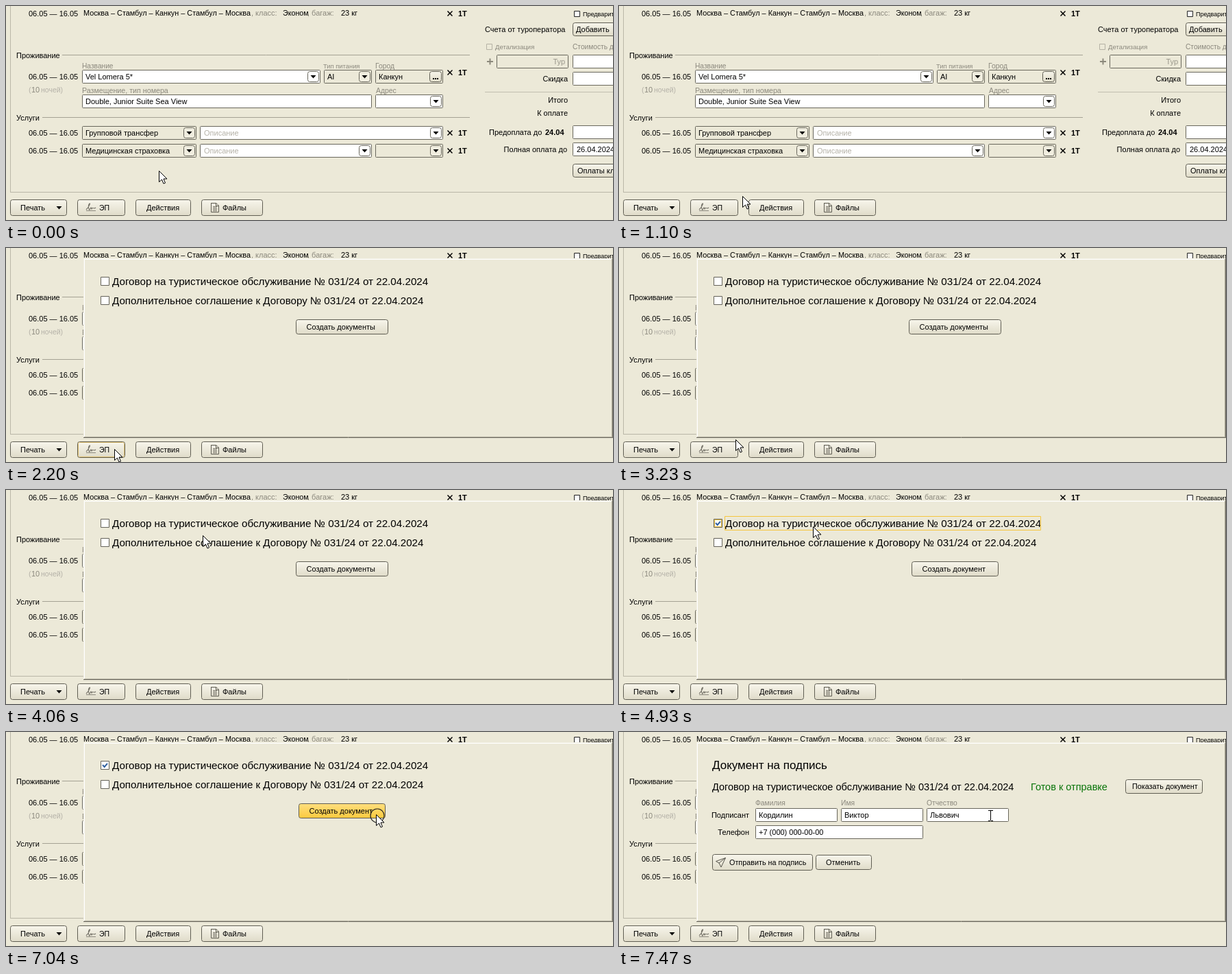
These frames come from a looping animation (886 by 312 pixels, 8000 ms). An HTML page with a canvas:

```html
<!DOCTYPE html>
<html lang="ru">
<head>
<meta charset="utf-8">
<title>Заявка</title>
<style>
html, body { margin: 0; width: 100%; height: 100%; overflow: hidden; background: #ece9d8; }
canvas { display: block; width: 886px; height: 312px; }
</style>
</head>
<body>
<canvas id="stage" width="886" height="312"></canvas>
<script>
const ctx = document.getElementById('stage').getContext('2d');
const LOOP = 8000;
const BG = '#ece9d8', EDGE = '#69675c', RULE = '#a5a294', LABEL = '#8b887d', HINT = '#b5b2a8', AMBER = '#f5c53d';

function text(s, x, y, { size = 11, color = '#000', bold = false, align = 'left' } = {}) {
  ctx.font = `${bold ? 'bold ' : ''}${size}px "Liberation Sans", Arial, sans-serif`;
  ctx.fillStyle = color;
  ctx.textAlign = align;
  ctx.fillText(s, x, y);
}
const label = (s, x, y, size = 10.4) => text(s, x, y, { size, color: LABEL });
const right = (s, x, y, color) => text(s, x, y, { align: 'right', color });

function line(points, color = EDGE, width = 1) {
  ctx.beginPath();
  points.forEach(([x, y]) => ctx.lineTo(x, y));
  ctx.strokeStyle = color;
  ctx.lineWidth = width;
  ctx.stroke();
}
const hline = (x1, x2, y, color = RULE) => line([[x1, y + .5], [x2, y + .5]], color);
const vline = (x, y1, y2, color = RULE) => line([[x + .5, y1], [x + .5, y2]], color);

function box(x, y, w, h, fill, edge = EDGE, radius = 1) {
  ctx.beginPath();
  ctx.roundRect(x + .5, y + .5, w - 1, h - 1, radius);
  if (fill) { ctx.fillStyle = fill; ctx.fill(); }
  ctx.strokeStyle = edge;
  ctx.lineWidth = 1;
  ctx.stroke();
}

function button(x, y, w, h, state = '') {
  const fill = ctx.createLinearGradient(0, y, 0, y + h);
  const [top, bottom] = state === 'pressed' ? ['#ffdf80', '#fbc93c'] : ['#f8f6ec', '#dfdbc8'];
  fill.addColorStop(0, top);
  fill.addColorStop(1, bottom);
  box(x, y, w, h, fill, state === 'disabled' ? '#b9b6a8' : '#605e53', 3);
  if (state === 'hover') box(x + 1, y + 1, w - 2, h - 2, null, '#dfc070', 2);
}

function triangle(x, y) {
  ctx.beginPath();
  ctx.moveTo(x - 4, y - 2);
  ctx.lineTo(x + 4, y - 2);
  ctx.lineTo(x, y + 2.5);
  ctx.fillStyle = '#000';
  ctx.fill();
}

function field(x, y, w, h = 20, { fill = '#fff', value = '', hint = false, drop = false } = {}) {
  box(x, y, w, h, fill);
  if (value) text(value, x + (hint ? 6 : 5), y + h - 6, { color: hint ? HINT : '#000' });
  if (drop) {
    box(x + w - 19, y + 2, 17, h - 4, fill === BG ? '#f0eddf' : '#fff', EDGE, 3);
    triangle(x + w - 10.5, y + h / 2);
  }
}

function rowEnd(y) {
  line([[644.5, y - 3.5], [651.5, y + 3.5]], '#000', 1.5);
  line([[651.5, y - 3.5], [644.5, y + 3.5]], '#000', 1.5);
  text('1Т', 660, y + 4, { bold: true });
}

function trip() {
  [15, 107, 189, 215].forEach(y => text('06.05 — 16.05', 33, y));
  [11, 97, 185, 211].forEach(rowEnd);
  text('Москва – Стамбул – Канкун – Стамбул – Москва', 113, 14, { size: 10.85 });
  label(', класс:', 358, 14, 11);
  text('Эконом', 404, 14, { size: 10.7 });
  label(', багаж:', 440, 14, 11);
  text('23 кг', 489, 14);

  text('Проживание', 15, 76);
  hline(82, 677, 71);
  label('Название', 111, 91, 10.2);
  label('Тип питания', 463, 91, 9.4);
  label('Город', 539, 91);
  field(111, 93, 348, 20, { value: 'Vel Lomera 5*', drop: true });
  field(464, 93, 70, 20, { fill: BG, value: 'AI', drop: true });
  field(539, 93, 99, 20, { fill: BG, value: 'Канкун' });
  button(618, 95, 18, 16);
  ctx.fillStyle = '#000';
  [623, 626, 629].forEach(x => ctx.fillRect(x, 105, 2, 2));
  text('(', 33, 126, { color: HINT });
  text('10', 37, 126, { color: LABEL });
  text('ночей)', 51, 126, { color: HINT, size: 10.5 });
  label('Размещение, тип номера', 111, 127, 10.7);
  label('Адрес', 540, 127);
  field(111, 129, 423, 20, { value: 'Double, Junior Suite Sea View' });
  field(539, 129, 99, 20, { drop: true });

  text('Услуги', 15, 167);
  hline(53, 677, 162);
  field(111, 175, 167, 20, { fill: BG, value: 'Групповой трансфер', drop: true });
  field(283, 175, 355, 20, { value: 'Описание', hint: true, drop: true });
  field(111, 201, 167, 20, { fill: BG, value: 'Медицинская страховка', drop: true });
  field(283, 201, 251, 20, { value: 'Описание', hint: true, drop: true });
  field(539, 201, 99, 20, { fill: BG, drop: true });
}

function payments() {
  box(829, 7, 9, 9, '#fff', '#222', 0);
  text('Предварительно', 842, 15, { size: 9 });
  text('Счета от туроператора', 699, 38);
  button(827, 24, 70, 20);
  text('Добавить', 832, 38);
  box(701, 55, 9, 9, BG, '#b5b2a5', 0);
  label('Детализация', 714, 63, 9.5);
  label('Стоимость до', 827, 63, 10.2);
  line([[702, 81], [711, 81]], '#8c897c', 2);
  line([[706.5, 76.5], [706.5, 85.5]], '#8c897c', 2);
  field(716, 71, 105, 20, { fill: BG });
  right('Тур', 816, 85, '#9a978b');
  [71, 96, 174, 199].forEach(y => field(827, y, 80));
  right('Скидка', 820, 110);
  hline(699, 886, 125, '#c1beb0');
  right('Итого', 820, 141);
  right('К оплате', 820, 160);
  text('Предоплата до', 705, 188);
  text('24.04', 787, 188, { bold: true });
  right('Полная оплата до', 819, 213);
  text('26.04.2024', 833, 213);
  button(827, 230, 90, 20);
  text('Оплаты клиента', 834, 244);
}

function toolbar(signState) {
  button(6, 282, 83, 24);
  text('Печать', 21, 298);
  triangle(77.5, 294);
  button(104, 282, 70, 24, signState);
  text('ЭП', 136, 298, { size: 10.5 });
  ctx.beginPath();
  ctx.moveTo(117, 297);
  ctx.bezierCurveTo(120, 294, 124, 287, 122, 288);
  ctx.bezierCurveTo(119, 290, 121, 298, 122, 297);
  ctx.bezierCurveTo(125, 292, 124, 294, 125, 296);
  ctx.bezierCurveTo(127, 292, 127, 297, 131, 294);
  ctx.strokeStyle = '#77746a';
  ctx.lineWidth = 1.1;
  ctx.stroke();
  hline(117, 131, 298, '#8d8a7f');
  button(189, 282, 81, 24);
  text('Действия', 205, 298);
  button(285, 282, 90, 24);
  line([[299.5, 287.5], [307, 287.5], [310.5, 291], [310.5, 300.5], [299.5, 300.5], [299.5, 287]], '#5e5c52');
  line([[306.5, 287.5], [306.5, 291.5], [310.5, 291.5]], '#5e5c52');
  [292, 294, 296, 298].forEach(y => hline(302, 308, y, '#77746a'));
  text('Файлы', 316, 298);
}

function popup() {
  ctx.fillStyle = BG;
  ctx.fillRect(113, 15, 773, 262);
  hline(113, 886, 15, '#f1efe2');
  vline(113, 15, 277, '#f1efe2');
  hline(114, 885, 16, '#fff');
  vline(114, 16, 276, '#fff');
  hline(114, 885, 275, '#aca899');
  vline(884, 16, 276, '#aca899');
  hline(113, 886, 276, '#716f64');
  vline(885, 15, 277, '#716f64');
}

function checkbox(y, checked, hover) {
  box(138, y, 13, 13, '#fff', '#65635a', 0);
  if (hover) box(139, y + 1, 11, 11, null, AMBER, 0);
  if (checked) line([[141, y + 6], [143.7, y + 9], [148, y + 3.8]], '#2f5f9f', 2);
}

function inside({ x, y }, left, top, w, h) {
  return x >= left && x < left + w && y >= top && y < top + h;
}

function chooser(t, p) {
  const checked = t >= 4930;
  popup();
  checkbox(42, checked, inside(p, 138, 39, 478, 20));
  checkbox(70, false, inside(p, 138, 67, 472, 20));
  text('Договор на туристическое обслуживание № 031/24 от 22.04.2024', 155, 54, { size: 15.2 });
  text('Дополнительное соглашение к Договору № 031/24 от 22.04.2024', 155, 82, { size: 15.1 });
  if (t >= 4780 && t < 7040) box(154, 38, 462, 21, null, AMBER, 0);
  const x = checked ? 427 : 423, w = checked ? 127 : 135;
  const state = t >= 7040 ? 'pressed' : inside(p, x, 104, w, 22) ? 'hover' : '';
  button(x, 104, w, 22, state);
  text(checked ? 'Создать документ' : 'Создать документы', x + 15.5, 119);
}

function signForm(ready) {
  popup();
  text('Документ на подпись', 136, 54, { size: 17 });
  text('Договор на туристическое обслуживание № 031/24 от 22.04.2024', 136, 85, { size: 14.5 });
  if (ready) {
    text('Готов к отправке', 601, 85, { size: 14.5, color: '#087408' });
    button(739, 69, 113, 21);
    text('Показать документ', 749, 83, { size: 10.8 });
  } else {
    text('Идёт подготовка…', 601, 85, { size: 14.5, color: LABEL });
  }
  [['Фамилия', 'Кордилин'], ['Имя', 'Виктор'], ['Отчество', 'Львович']].forEach(([name, value], i) => {
    label(name, 199 + 125 * i, 107, 10.3);
    field(199 + 125 * i, 111, 120, 20, { value });
  });
  right('Подписант', 190, 125);
  right('Телефон', 190, 150);
  field(199, 136, 245, 20, { value: '+7 (000) 000-00-00' });
  const ink = ready ? '#000' : '#a19e91';
  button(136, 178, 147, 24, ready ? '' : 'disabled');
  line([[155.5, 183.5], [141.5, 188.5], [146, 191], [149, 197], [155.5, 183.5], [146, 191]], ready ? '#55534a' : ink);
  text('Отправить на подпись', 161, 194, { color: ink, size: 10.8 });
  button(287, 179, 82, 22);
  text('Отменить', 302, 194);
}

const smooth = u => u * u * (3 - 2 * u);
const easeOut = u => u * (2 - u);
const linear = u => u;

// Each move shows its first pose at `start` and its last at `end`.
const moves = [
  { start: 0, end: 0, steps: 1, from: [223, 240], to: [223, 240], ease: linear },
  { start: 430, end: 1350, steps: 8, from: [222, 242], to: [169, 286], ease: smooth },
  { start: 1500, end: 1650, steps: 2, from: [162, 291], to: [158, 293], ease: linear },
  { start: 3230, end: 4210, steps: 8, from: [170, 279], to: [294, 54], ease: smooth },
  { start: 4360, end: 4500, steps: 2, from: [287, 53], to: [283, 53], ease: linear },
  { start: 5070, end: 5350, steps: 3, from: [283, 55], to: [288, 63], ease: linear },
  { start: 5500, end: 6500, steps: 8, from: [294, 70], to: [536, 120], ease: easeOut },
  { start: 6620, end: 6770, steps: 2, from: [538, 120], to: [540, 120], ease: linear },
];

function pointer(t) {
  const m = moves.filter(move => t >= move.start).pop();
  const last = m.steps - 1;
  // The slack absorbs the uneven 10 ms rounding of the steps.
  const step = last ? Math.min(last, Math.floor((t - m.start) / (m.end - m.start) * last + .1)) : 0;
  const u = last ? m.ease(step / last) : 1;
  const [x, y] = m.from.map((a, i) => Math.round(a + (m.to[i] - a) * u));
  return { x, y };
}

function arrow({ x, y }) {
  const shape = [[0, 0], [0, 16], [4, 12.5], [6.5, 18.5], [9, 17.5], [6.5, 11.5], [11.5, 11.5]];
  ctx.beginPath();
  shape.forEach(([dx, dy]) => ctx.lineTo(x + dx + .5, y + dy + .5));
  ctx.closePath();
  ctx.fillStyle = '#fff';
  ctx.fill();
  ctx.strokeStyle = '#000';
  ctx.lineWidth = 1;
  ctx.stroke();
}

function clickRing({ x, y }) {
  ctx.beginPath();
  ctx.arc(x + 2, y + 2, 10, 0, Math.PI * 2);
  ctx.strokeStyle = '#222';
  ctx.lineWidth = 1.2;
  ctx.stroke();
}

function iBeam(x, y) {
  vline(x, y - 7, y + 8, '#000');
  [y - 7, y + 8].forEach(edge => {
    hline(x - 3, x, edge, '#000');
    hline(x + 1, x + 4, edge, '#000');
  });
}

const between = (t, a, b) => t >= a && t < b;

function draw(t) {
  const p = pointer(t);
  ctx.fillStyle = BG;
  ctx.fillRect(0, 0, 886, 312);
  vline(6, 0, 272, '#bab7a8');
  hline(6, 886, 271, '#bab7a8');
  trip();
  payments();
  toolbar(between(t, 2080, 2200) ? 'pressed' : t < 3230 && inside(p, 104, 282, 70, 24) ? 'hover' : '');

  if (t >= 7190) signForm(t >= 7470);
  else if (t >= 2200) chooser(t, p);

  if (t >= 7190) {
    iBeam(542, 121);
  } else {
    if (between(t, 2080, 2200) || between(t, 4780, 4930) || t >= 7040) clickRing(p);
    arrow(p);
  }
}

const began = performance.now();
function tick() {
  draw((performance.now() - began) % LOOP);
  requestAnimationFrame(tick);
}
tick();
</script>
</body>
</html>
```
